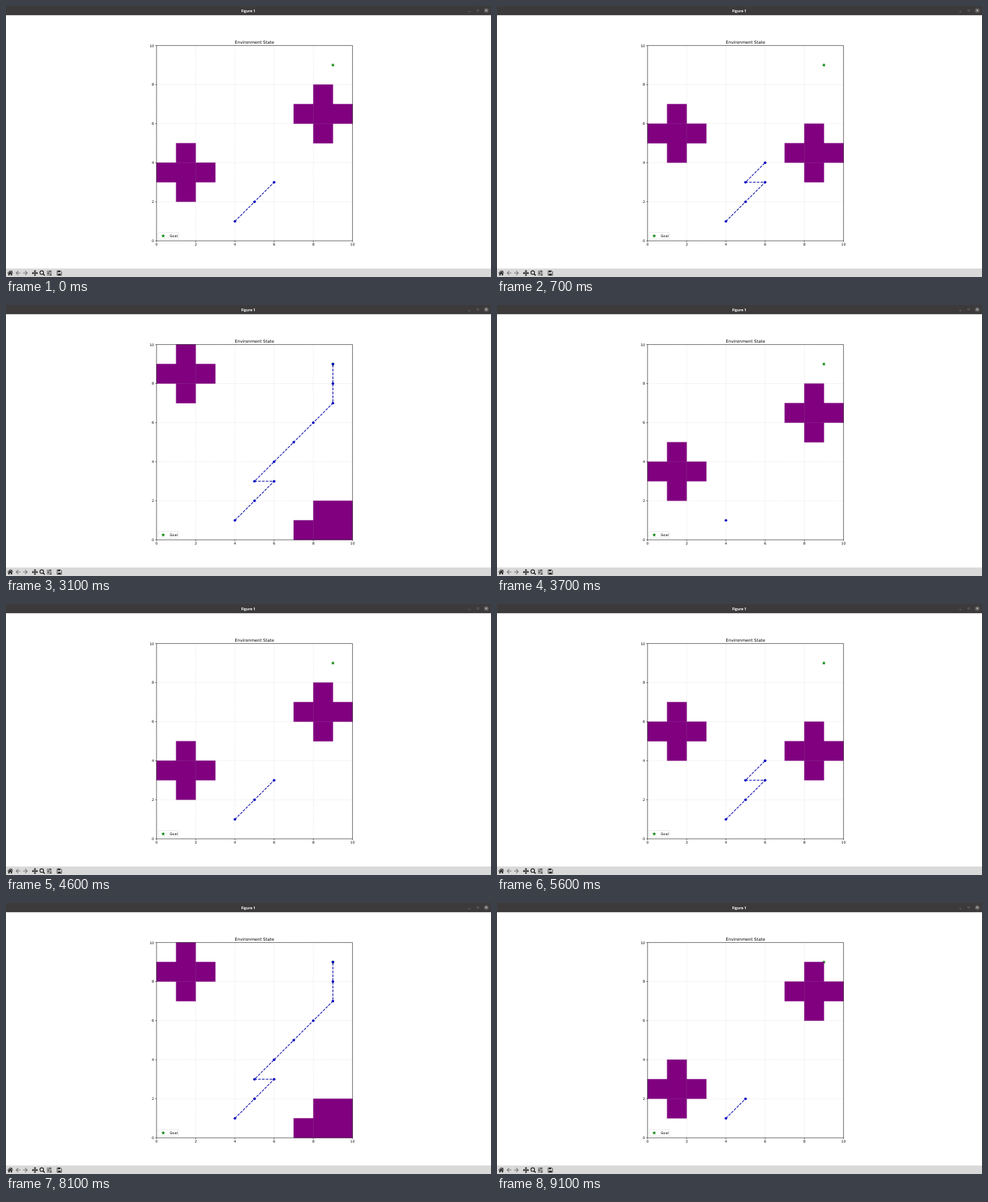
Write an HTML page that moves like this. It is 692 px wide and 388 px high and loops after 9.2 s.

```html
<!DOCTYPE html>
<html lang="en">
<head>
<meta charset="utf-8">
<title>Figure 1</title>
<style>
  html, body { margin: 0; width: 100%; height: 100%; overflow: hidden; background: #fff; }
  svg { display: block; width: 100%; height: 100%; }
  text { font: 5px "DejaVu Sans", sans-serif; }
  .mid { text-anchor: middle; }
  .end { text-anchor: end; }
  .grid { stroke: #b0b0b0; stroke-opacity: .5; stroke-width: .4; stroke-dasharray: 1.5 .65; }
  .axis { fill: none; stroke: #000; stroke-width: .55; }
  .line { fill: none; stroke: #0000a8; stroke-width: 1.05; stroke-dasharray: 3.8 1.65; }
  .icon { fill: none; stroke: #1c1c1c; stroke-width: 1.1; }
  .icon .fill { fill: #1c1c1c; stroke: none; }
</style>
</head>
<body>
<svg viewBox="0 0 692 388">
  <rect width="692" height="13.2" fill="#3c3a3b"/>
  <text class="mid" x="345.6" y="8.7" fill="#fff" style="font: bold 5.2px 'Open Sans', sans-serif">Figure 1</text>
  <g fill="none" stroke="#aaa" stroke-width=".5">
    <path d="M659.7 8h2.7"/>
    <rect x="671.9" y="5.3" width="2.4" height="2.4" stroke="#777"/>
    <circle cx="685.3" cy="6.4" r="3.5" fill="#5b595a" stroke="none"/>
    <path d="M684 5.1l2.6 2.6m0-2.6l-2.6 2.6" stroke="#fff" stroke-width=".7"/>
  </g>

  <text class="mid" x="354.6" y="53.7" style="font-size: 6px">Environment State</text>
  <path id="goal" fill="#008000"/>
  <path id="cells" fill="#800080" stroke="#800080" stroke-width=".4"/>
  <path id="grid" class="grid"/>
  <path id="line" class="line"/>
  <g id="dots" fill="#0000c0"></g>
  <path id="axis" class="axis"/>
  <g id="labels"></g>

  <rect x="217.2" y="324.4" width="29.2" height="9.2" rx=".8" fill="#fff" fill-opacity=".8" stroke="#ccc" stroke-opacity=".8" stroke-width=".5"/>
  <path id="key" fill="#008000"/>
  <text x="233.5" y="330.7">Goal</text>

  <rect y="375.8" width="692" height="12.2" fill="#d9d9d9"/>
  <g class="icon">
    <path class="fill" d="M6 378.5L1.9 382.2l.5.6L6 379.6l3.6 3.2.5-.6-1.3-1.2v-2h-1.1v1zM6 380.3l-2.7 2.4v3h1.9v-2.1h1.6v2.1h1.9v-3z"/>
    <path d="M20.5 382.3h-6m3-3l-3 3 3 3M24.3 382.3h6m-3-3l3 3-3 3" stroke="#777"/>
    <path d="M41.3 379.5v5.8M38.4 382.4h5.8"/>
    <path class="fill" d="M41.3 378l1.8 2.1h-3.6zM41.3 386.8l1.8-2.1h-3.6zM36.9 382.4l2.1-1.8v3.6zM45.7 382.4l-2.1-1.8v3.6z"/>
    <circle cx="51" cy="381.7" r="2.6"/>
    <path d="M52.9 383.6l2.3 2.4" stroke-width="1.5"/>
    <path d="M58.3 379.8h7M58.3 382.4h7M58.3 385h7" stroke-width=".8"/>
    <path d="M62.9 378.8v2M60.2 381.4v2M63.9 384v2" stroke-width="1.3"/>
    <path d="M73 379.2h4.9l1.3 1.3v5.1H73z" stroke-width=".8"/>
    <path class="fill" d="M74.2 379h3v2.2h-3zM74.2 383.2h3.8v2.3h-3.8z"/>
  </g>
</svg>
<script>
const LOOP = 9200, STEP = 500, UNIT = 27.96;
const px = x => 214.8 + UNIT * x;
const py = y => 336.2 - UNIT * y;
const el = id => document.getElementById(id);
const draw = (id, d) => el(id).setAttribute("d", d);

const route = [[4, 1], [5, 2], [6, 3], [5, 3], [6, 4], [7, 5], [8, 6], [9, 7], [9, 8], [9, 9]];
const leftRows = [3, 2, 3, 4, 5, 6, 7, 8, 9, 8];
const piled = [[7, 0], [8, 0], [9, 0], [8, 1], [9, 1]];

const cross = (x, y) => [[x, y], [x - 1, y], [x + 1, y], [x, y - 1], [x, y + 1]];

function star(x, y, r) {
  const points = Array.from({ length: 10 }, (_, i) => {
    const a = i * Math.PI / 5, d = i % 2 ? r * .382 : r;
    return [x + d * Math.sin(a), y - d * Math.cos(a)];
  });
  return "M" + points.join("L") + "Z";
}

function drawAxes() {
  const side = 10 * UNIT;
  let grid = "", axis = `M${px(0)} ${py(0)}h${side}v${-side}h${-side}z`, labels = "";
  for (let v = 0; v <= 10; v += 2) {
    const x = px(v), y = py(v);
    grid += `M${x} ${py(0)}v${-side}M${px(0)} ${y}h${side}`;
    axis += `M${x} ${py(0)}v1.8M${px(0)} ${y}h-1.8`;
    labels += `<text class="mid" x="${x}" y="343.4">${v}</text>` +
      `<text class="end" x="211.3" y="${y + 1.9}">${v}</text>`;
  }
  draw("grid", grid);
  draw("axis", axis);
  el("labels").innerHTML = labels;
  draw("goal", star(px(9), py(9), 3));
  draw("key", star(224.3, 329.2, 3));
}

function drawState(k) {
  const row = leftRows[k];
  const right = k < 8 ? cross(8, 9 - row) : piled;
  const cells = [...cross(1, row), ...right].filter(([, y]) => y >= 0 && y < 10);
  draw("cells", cells.map(([x, y]) => `M${px(x)} ${py(y)}h${UNIT}v${-UNIT}h${-UNIT}z`).join(""));

  const points = route.slice(0, k + 1).map(([x, y]) => [px(x), py(y)]);
  draw("line", "M" + points.join("L"));
  el("dots").innerHTML = points.map(([x, y]) => `<circle cx="${x}" cy="${y}" r="1.85"/>`).join("");
}

let shown = -1;
function tick() {
  const t = performance.now() % LOOP;
  const k = (Math.floor((t + 400) / STEP) + 2) % route.length;
  if (k !== shown) drawState(shown = k);
  requestAnimationFrame(tick);
}

drawAxes();
tick();
</script>
</body>
</html>
```
